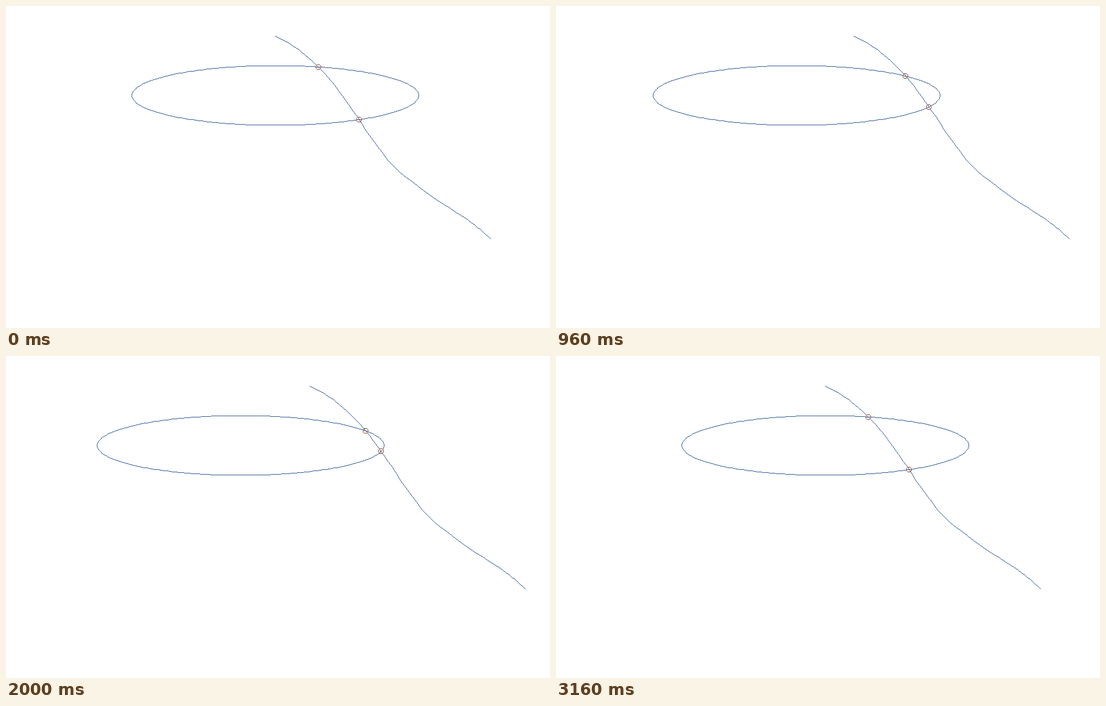
Recreate the animation shown at these times as an HTML page with a canvas. Size 910 by 540 pixels, loop 3.2 s.

```html
<!DOCTYPE html>
<html lang="en">
<head>
<meta charset="utf-8">
<title>Curve and ellipse intersections</title>
<style>
html, body { margin: 0; width: 100%; height: 100%; overflow: hidden; background: #fff; }
canvas { display: block; }
</style>
</head>
<body>
<canvas id="stage" width="910" height="540"></canvas>
<script>
const ctx = document.getElementById('stage').getContext('2d');
const BLUE = '#36609f', BROWN = '#a0522d';
const STEP = 40, FRAMES = 80;
const RX = 240, RY = 50, CX = 450, CY = 150;

const knots = [
  [450, 50], [480, 66.5], [499, 81], [522.5, 102.5], [543.5, 125.5], [569, 159.5],
  [590.5, 190.5], [607, 216], [635, 253.5], [649, 269], [664, 282.5], [705, 314],
  [750, 343.5], [778, 362.5], [797, 378], [810, 390]
];

// Catmull-Rom interpolation through the knots
function spline(pts, parts) {
  const out = [];
  for (let i = 0; i < pts.length - 1; i++) {
    const a = pts[Math.max(i - 1, 0)], b = pts[i], c = pts[i + 1];
    const d = pts[Math.min(i + 2, pts.length - 1)];
    for (let j = 0; j < parts; j++) {
      const t = j / parts;
      out.push([0, 1].map(k => b[k] + t / 2 * (c[k] - a[k] +
        t * (2 * a[k] - 5 * b[k] + 4 * c[k] - d[k] + t * (3 * (b[k] - c[k]) + d[k] - a[k])))));
    }
  }
  out.push(pts[pts.length - 1]);
  return out;
}

function ring(rx, ry, sides) {
  return Array.from({ length: sides + 1 }, (_, i) => {
    const a = i / sides * 2 * Math.PI;
    return [rx * Math.cos(a), ry * Math.sin(a)];
  });
}

const coarse = spline(knots, 4), fine = spline(knots, 24);
const ellipse = ring(RX, RY - 0.01, 256).map(([x, y]) => [x, Math.floor(y)]);
const marker = ring(4, 4, 16);

// Unsmoothed one-pixel polyline
function plot(pts, ox, oy, color) {
  ctx.fillStyle = color;
  const snapped = pts.map(([x, y]) => [Math.round(x + ox), Math.round(y + oy)]);
  for (let i = 1; i < snapped.length; i++) {
    const [x0, y0] = snapped[i - 1], [x1, y1] = snapped[i];
    const n = Math.max(Math.abs(x1 - x0), Math.abs(y1 - y0), 1);
    for (let k = 0; k <= n; k++) {
      ctx.fillRect(Math.round(x0 + (x1 - x0) * k / n), Math.round(y0 + (y1 - y0) * k / n), 1, 1);
    }
  }
}

function crossings(shift) {
  const side = ([x, y]) => ((x + 2 * shift - CX) / RX) ** 2 + ((y - CY) / RY) ** 2 - 1;
  const hits = [];
  for (let i = 1; i < fine.length; i++) {
    const p = fine[i - 1], q = fine[i], a = side(p), b = side(q);
    if (a * b < 0) {
      const t = a / (a - b);
      hits.push([p[0] + (q[0] - p[0]) * t + shift, p[1] + (q[1] - p[1]) * t]);
    }
  }
  return hits;
}

function draw() {
  const frame = Math.floor(performance.now() / STEP) % FRAMES;
  const shift = 2 * Math.min(frame, FRAMES - 1 - frame);
  ctx.fillStyle = '#fff';
  ctx.fillRect(0, 0, 910, 540);
  plot(ellipse, CX - shift, CY, BLUE);
  plot(coarse, shift, 0, BLUE);
  for (const [x, y] of crossings(shift)) plot(marker, Math.floor(x), Math.floor(y), BROWN);
  requestAnimationFrame(draw);
}
draw();
</script>
</body>
</html>
```
